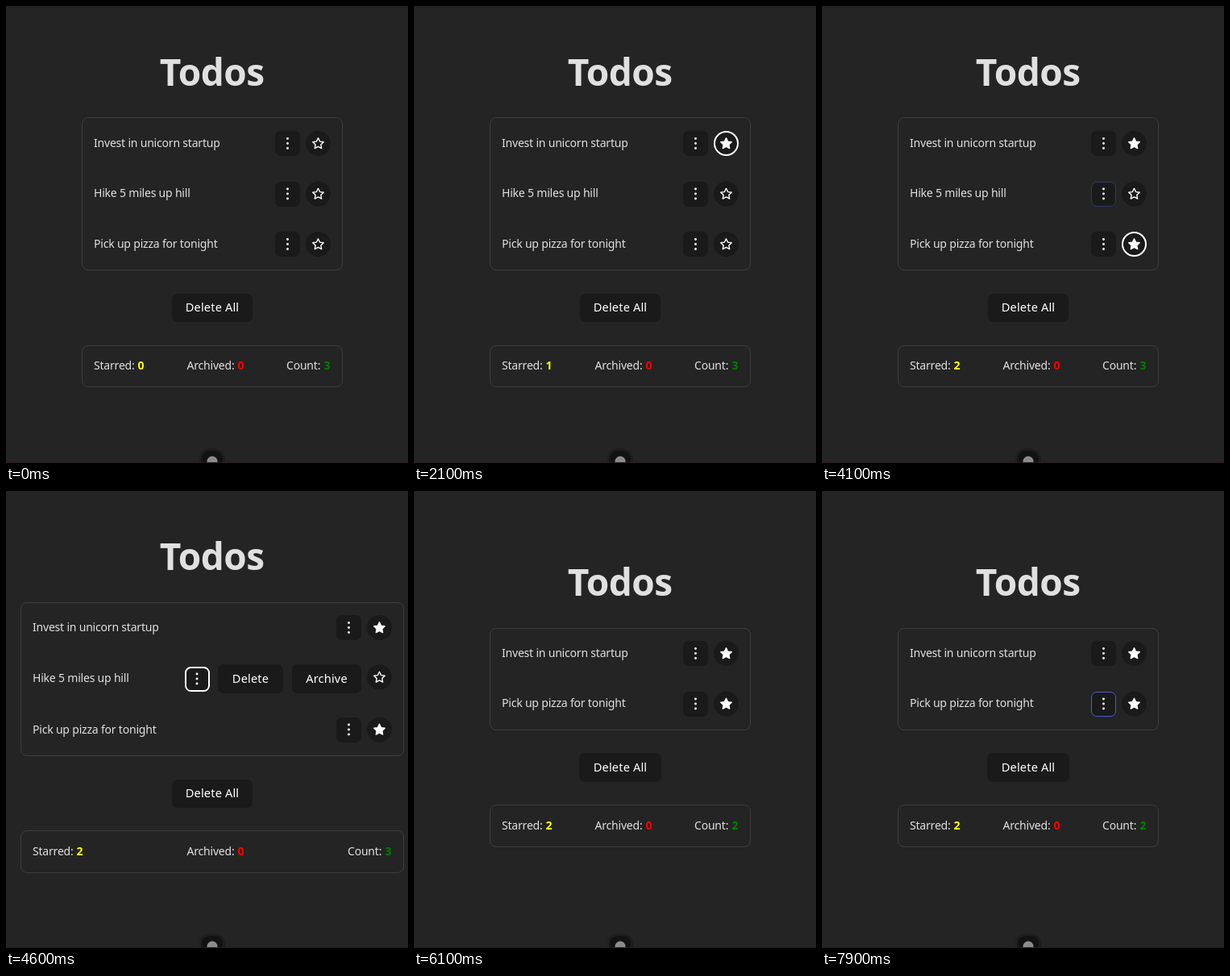
An HTML page that plays this animation: 499 by 567 pixels, repeating every 8 s.

```html
<!DOCTYPE html>
<html lang="en">
<head>
<meta charset="utf-8">
<title>Todos</title>
<style>
  html, body { margin: 0; width: 100%; height: 100%; overflow: hidden; background: #242424; }
  svg { display: block; width: 499px; height: 567px; }
  text { font: 400 14px "Noto Sans", "Open Sans", sans-serif; fill: #e0e0e0; letter-spacing: -.2px; white-space: pre; }
  .title { font-size: 46px; font-weight: 600; letter-spacing: -.5px; }
  .label { font-size: 14.6px; font-weight: 500; fill: #fff; letter-spacing: .15px; text-anchor: middle; }
  .num { font-weight: 700; letter-spacing: 0; }
  .card { fill: none; stroke: #3d3d3d; }
  .btn { fill: #1a1a1a; }
  .hover { fill: none; stroke: #646cff; }
  .ring { fill: none; stroke: #fff; stroke-width: 2; }
  .star { stroke: #fff; stroke-width: 1.4; stroke-linejoin: round; }
</style>
</head>
<body>
<svg id="stage" viewBox="0 0 499 567"></svg>
<script>
const stage = document.getElementById('stage');
const LOOP = 8000, STEP = 100, FADE = 250;

const TODOS = ['Invest in unicorn startup', 'Hike 5 miles up hill', 'Pick up pizza for tonight'];

// rows: [todo, text baseline, menu centre y, star centre y]
const LAYOUTS = {
  list: {
    left: 94, right: 418, title: 99, card: [138, 328], del: [206, 357, 100, 35], stats: [421, 473],
    rows: [[0, 175, 170.5, 170.5], [1, 237, 233, 233], [2, 300, 295.5, 295.5]]
  },
  menu: {
    left: 18, right: 494, title: 98, card: [138, 329], del: [206, 358, 100, 35], stats: [421, 474],
    rows: [[0, 174, 169.5, 169.5], [1, 237, 233, 231], [2, 301, 296, 296]]
  },
  short: {
    left: 94, right: 418, title: 130, card: [170, 297], del: [205, 325, 102, 36], stats: [389, 442],
    rows: [[0, 206, 201.5, 201.5], [2, 268, 264, 264]]
  }
};

// hover spans: [control, enter, leave]
const HOVERS = [
  ['menu0', 550, 935], ['star0', 1300, 2600], ['star1', 2600, 2660], ['star2', 2950, 3870],
  ['star1', 3850, 3890], ['menu1', 4000, 4500], ['archive', 5070, 5420], ['delete', 5430, 6000],
  ['menu0', 6980, 7260], ['menu2', 7330, 7825]
];

// focus spans: [control, from, to]
const FOCUS = [['star0', 2100, 3300], ['star2', 3300, 4500], ['menu1', 4500, 6000]];

const ease = x => { x = Math.min(1, Math.max(0, x)); return x * x * (3 - 2 * x); };

function glow(id, t) {
  return Math.max(0, ...HOVERS.filter(h => h[0] === id).map(([, a, b]) =>
    ease((Math.min(t, b) - a) / FADE) * (1 - ease((t - b) / FADE))));
}

const focused = (id, t) => FOCUS.some(([f, a, b]) => f === id && t >= a && t < b);

const rect = (cls, x, y, w, h, r, extra = '') =>
  `<rect class="${cls}" x="${x}" y="${y}" width="${w}" height="${h}" rx="${r}" ${extra}/>`;
const circle = (cls, x, y, r, extra = '') =>
  `<circle class="${cls}" cx="${x}" cy="${y}" r="${r}" ${extra}/>`;
const text = (cls, x, y, s, extra = '') => `<text class="${cls}" x="${x}" y="${y}" ${extra}>${s}</text>`;
const card = (l, [top, bottom]) =>
  rect('card', l.left + .5, top + .5, l.right - l.left - 1, bottom - top - 1, 7.5);

function box(id, x, y, w, h, t) {
  const g = glow(id, t);
  let s = rect('btn', x, y, w, h, 7);
  if (focused(id, t)) s += rect('ring', x + 1, y + 1, w - 2, h - 2, 6.5);
  else if (g) s += rect('hover', x + .5, y + .5, w - 1, h - 1, 6.5, `opacity="${g.toFixed(3)}"`);
  return s;
}

// the box snaps to whole pixels, the dots do not
function menuButton(id, x, y, t) {
  const dots = [-6, 0, 6].map(d => circle('', x, y + d, 1.45, 'fill="#fff"'));
  return box(id, Math.round(x - 15.5), Math.round(y - 15.5), 31, 31, t) + dots.join('');
}

function starButton(id, x, y, on, t) {
  const g = glow(id, t);
  let s = circle('btn', x, y, 15.5);
  if (focused(id, t)) s += circle('ring', x, y, 14.5);
  else if (g) s += circle('hover', x, y, 15, `opacity="${g.toFixed(3)}"`);
  const pts = Array.from({ length: 10 }, (_, i) => {
    const a = i * Math.PI / 5, r = i % 2 ? 3.5 : 7.1;
    return (x + r * Math.sin(a)).toFixed(2) + ',' + (y + .4 - r * Math.cos(a)).toFixed(2);
  });
  return s + `<polygon class="star" points="${pts.join(' ')}" fill="${on ? '#fff' : 'none'}"/>`;
}

function labelled(id, label, x, y, w, h, t) {
  return box(id, x, y, w, h, t) + text('label', x + w / 2, Math.round(y + h / 2 + 4.6), label);
}

function scene(t) {
  const name = t < 4500 ? 'list' : t < 6000 ? 'menu' : 'short';
  const l = LAYOUTS[name];
  const starred = [t >= 2100, false, t >= 3300];
  let s = text('title', 255.7, l.title, 'Todos', 'text-anchor="middle"') + card(l, l.card);

  for (const [i, base, my, sy] of l.rows) {
    const open = name === 'menu' && i === 1;
    s += text('', l.left + 15, base, TODOS[i]);
    s += menuButton('menu' + i, open ? 237 : l.right - 68.5, my, t);
    if (open) {
      s += labelled('delete', 'Delete', 263, 215, 81, 36, t);
      s += labelled('archive', 'Archive', 355, 215, 86, 36, t);
    }
    s += starButton('star' + i, l.right - 30.5, sy, starred[i], t);
  }

  s += labelled('all', 'Delete All', ...l.del, t) + card(l, l.stats);

  const y = Math.round((l.stats[0] + l.stats[1]) / 2 + 4.2);
  const stat = (x, nx, label, n, color) =>
    text('', x, y, label) + text('num', nx, y, n, `style="fill:${color}"`);
  s += stat(l.left + 15, l.left + 69.5, 'Starred:', starred.filter(Boolean).length, '#ffff00');
  s += stat(224.5, 287.5, 'Archived:', 0, '#ff0000');
  s += stat(l.right - 70, l.right - 23.5, 'Count:', l.rows.length, '#008000');

  // badge at the bottom edge
  s += rect('', 240, 549, 32, 36, 12, 'fill="#1e1e1e"') + rect('', 243, 552, 26, 30, 9, 'fill="#121212"');
  s += circle('', 256, 565, 6.5, 'fill="#8c8c8c"');
  return s + rect('', 0, 566, 499, 1, 0, 'fill="#2c1a1e"');
}

let shown = '';
const start = performance.now();
function draw() {
  const t = Math.floor((performance.now() - start) % LOOP / STEP) * STEP;
  const next = scene(t);
  if (next !== shown) stage.innerHTML = shown = next;
  requestAnimationFrame(draw);
}
draw();
</script>
</body>
</html>
```
